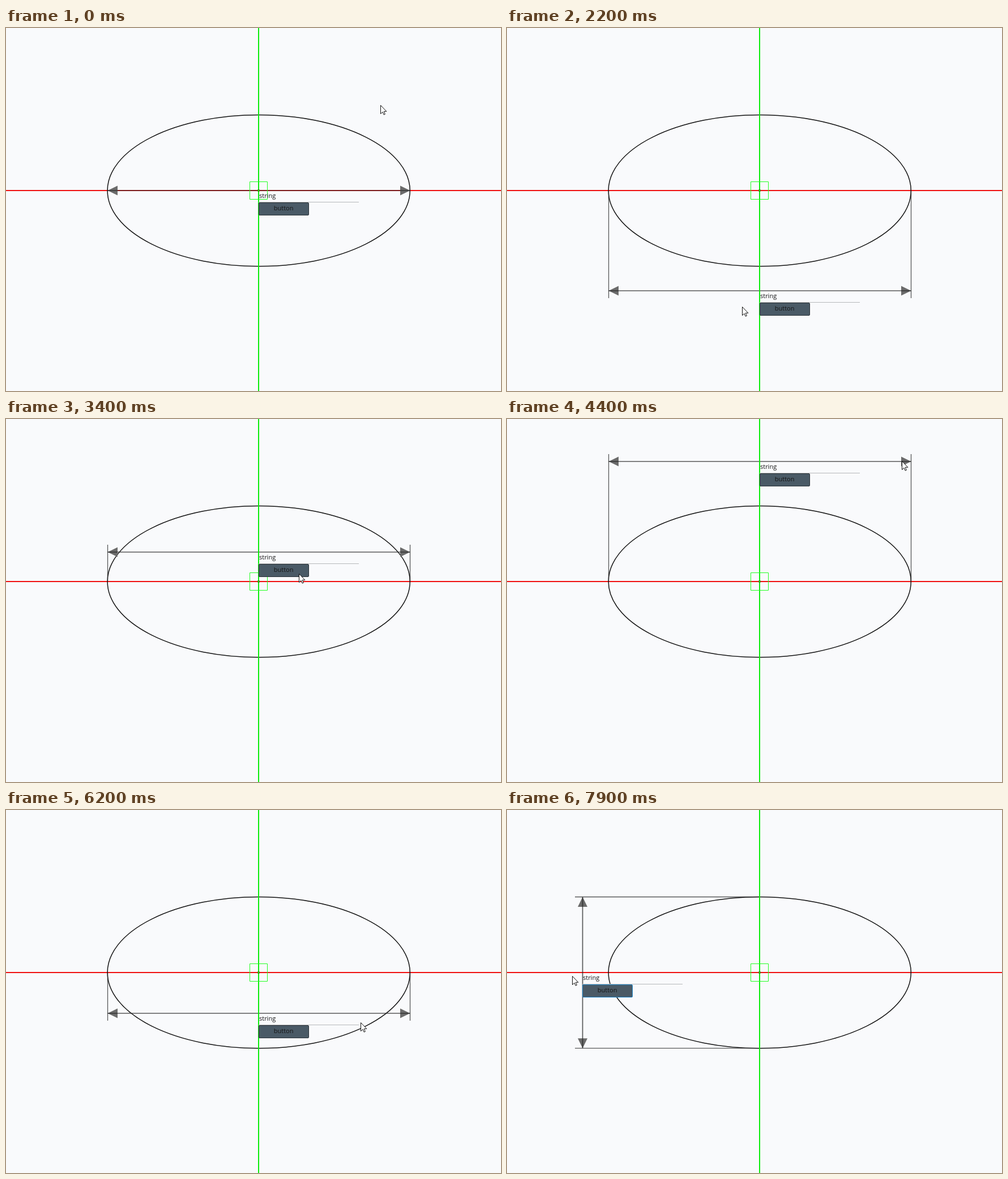
An HTML page that plays this animation: 874x641 px, repeating every 8000 ms.

```html
<!DOCTYPE html>
<html lang="en">
<head>
<meta charset="utf-8">
<title>Ellipse dimension drag</title>
<style>
  html, body { margin: 0; width: 100%; height: 100%; overflow: hidden; background: #f9fafc; }
  svg { display: block; width: 874px; height: 641px; }
  text { font: 11px "Open Sans", "Noto Sans", sans-serif; fill: #151515; }
  .dim path { stroke: rgba(35, 35, 35, .75); stroke-width: 1.7; fill: none; }
  .dim .heads { fill: #6b6b6b; stroke: none; }
  .dim .ext { stroke-width: 1.3; }
  #button { fill: #4a5a66; stroke: #2a3238; }
  #button.hover { stroke: #1b82c4; }
</style>
</head>
<body>
<svg viewBox="0 0 874 641">
  <path d="M0 287H874" stroke="#f01010" stroke-width="2"/>
  <ellipse cx="446.2" cy="287.1" rx="267.1" ry="133.7" fill="none" stroke="#131313" stroke-width="1.5"/>
  <g class="dim">
    <path id="heads" class="heads"/>
    <path id="ext" class="ext"/>
    <path id="line"/>
  </g>
  <path d="M446 0V641" stroke="#0bed0b" stroke-width="2"/>
  <path d="M430.5 271.5h31v31h-31z" fill="none" stroke="#1fff1f"/>
  <circle cx="446" cy="287" r="1.8" fill="none" stroke="#4a6a10"/>
  <g id="panel">
    <path d="M0 20.5H177" stroke="#b6b8ba"/>
    <rect id="button" x=".5" y="21.5" width="88" height="22" rx="1.5"/>
    <text x="1" y="13">string</text>
    <text x="44.2" y="35.3" text-anchor="middle">button</text>
  </g>
  <path id="cursor" d="M.5 .5V15.5L4 12.3L6.2 17.2L8.3 16.2L6.2 11.3H10.8Z" fill="#fff" stroke="#111"/>
</svg>
<script>
const LOOP = 8000, STEP = 100, LAG = 40, DRAG_START = 1200, HOVER_START = 7500;
const CX = 446, CY = 287, RX = 267, TOP = 153.5, BOTTOM = 420.7;

// Turning points of the pointer: time, x, y
const turns = [
  [0, 661, 136], [400, 379, 286], [1160, 379, 287], [1660, 387, 52],
  [2325, 418, 533], [3035, 456, 53], [3795, 586, 523], [4380, 696, 74],
  [4780, 800, 110], [5160, 690, 96], [5620, 760, 111], [6330, 614, 398],
  [7300, 43, 312], [7740, 160, 312], [8100, 52, 266]
];

const el = id => document.getElementById(id);
const draw = (id, d) => el(id).setAttribute("d", d);
const move = (id, x, y) => el(id).setAttribute("transform", `translate(${x} ${y})`);
const ease = k => (1 - Math.cos(Math.PI * k)) / 2;

function pointer(t) {
  const i = Math.max(1, turns.findIndex(p => p[0] >= t));
  const [t0, x0, y0] = turns[i - 1], [t1, x1, y1] = turns[i];
  const k = ease((t - t0) / (t1 - t0));
  return [Math.round(x0 + (x1 - x0) * k), Math.round(y0 + (y1 - y0) * k)];
}

function horizontal(y) {
  const l = CX - RX + .5, r = CX + RX + .5;
  const end = y + 13 * Math.sign(y - CY);
  draw("line", `M${l} ${y}H${r}`);
  draw("ext", `M${l} ${CY}V${end}M${r} ${CY}V${end}`);
  draw("heads", `M${l} ${y}l17.5 -8.5v17zM${r} ${y}l-17.5 -8.5v17z`);
  move("panel", CX, y);
}

function vertical(x) {
  const m = x + .5, end = x + 13 * Math.sign(x - CX);
  draw("line", `M${m} ${TOP}V${BOTTOM}`);
  draw("ext", `M${CX} ${TOP}H${end}M${CX} ${BOTTOM}H${end}`);
  draw("heads", `M${m} ${TOP}l-8.5 17.5h17zM${m} ${BOTTOM}l-8.5 -17.5h17z`);
  move("panel", x, CY);
}

function render(t) {
  move("cursor", ...pointer(t));
  const [x, y] = t < DRAG_START ? [CX, CY] : pointer(t - LAG);
  if (Math.abs(x - CX) > RX) vertical(x);
  else horizontal(y);
  el("button").classList.toggle("hover", t >= HOVER_START);
}

const start = performance.now();
function tick(now) {
  const t = Math.max(0, now - start) % LOOP;
  render(Math.floor(t / STEP) * STEP);
  requestAnimationFrame(tick);
}
render(0);
requestAnimationFrame(tick);
</script>
</body>
</html>
```
